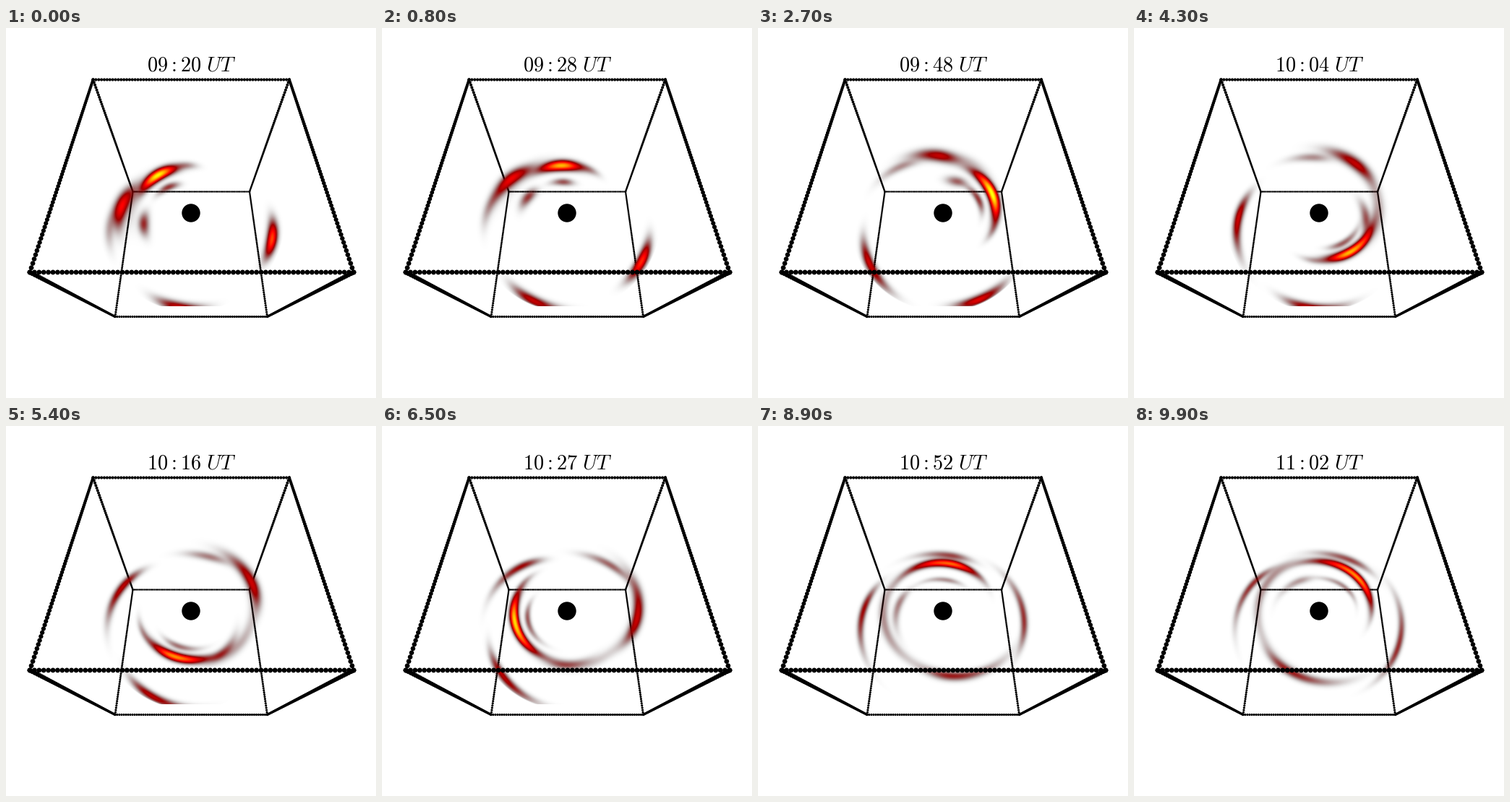
A matplotlib script that plays this animation: 512x512 px, repeating every 10000 ms.

```python
from collections import namedtuple

import numpy as np
import matplotlib.pyplot as plt
from matplotlib.animation import FuncAnimation

FRAMES = 100
SIZE, DPI = 512, 128
PX = 72 / DPI
CX = CY = 256

plt.rcParams["mathtext.fontset"] = "cm"


def cosd(a):
    return np.cos(np.radians(a))


def sind(a):
    return np.sin(np.radians(a))


# Polar grid: degrees clockwise from straight up
X0, X1, Y0, Y1 = 100, 412, 140, 400
gx, gy = np.meshgrid(np.arange(X0, X1) + 0.5, np.arange(Y0, Y1) + 0.5)
ANGLE = np.degrees(np.arctan2(gx - CX, CY - gy))
RADIUS = np.hypot(gx - CX, gy - CY)
LIMB = np.clip((130 - np.hypot(gx - 256, gy - 262)) / 2 + 0.5, 0, 1) * (gy < 385)


class Ring:
    """Tilted orbit: radius by angle, and uneven speed along it."""

    def __init__(self, size, drop, squash, skew, node=0):
        self.path = size - drop * cosd(ANGLE) - squash * cosd(2 * ANGLE)
        self.skew, self.node = skew, node

    def angle(self, phase):
        return phase + self.skew * sind(phase - self.node)


Spot = namedtuple("Spot", "ring phase rate length width pitch gain fade")

core = Ring(70, 0, 4, -9, 30)
inset = Ring(51, 4, 4, -9, 30)
middle = Ring(91, 5.5, 6, -9, 30)
shell = Ring(107, 27, 3, 8)
inner = Ring(62, 14, 2, 8)
bridge = Ring(80, 0, 3, 0)

spots = [
    Spot(core, -50, 4.65, 14, 4.6, -0.06, 0.75, 0.55),
    Spot(core, -12, 4.65, 9, 3.5, -0.06, 0.10, 0.07),
    Spot(inset, -50, 4.65, 12, 3.5, -0.06, 0.18, 0.10),
    Spot(middle, -92, 3.03, 11, 6, -0.25, 0.32, 0.22),
    Spot(inner, -95, 4.3, 9, 5, 0, 0.17, 0.09),
    Spot(bridge, -75, 3.8, 16, 6, -0.06, 0.05, 0.09),
    Spot(shell, 188, 2.02, 9, 4.6, -0.10, 0.32, 0.17),
    Spot(shell, 100, 2.02, 8, 4.6, -0.10, 0.42, 0.17),
    Spot(shell, -92, 2.02, 9, 4.6, -0.10, 0.07, 0.17),
]


def field(spot, i):
    t = i / (FRAMES - 1)
    angle = spot.ring.angle(spot.phase + spot.rate * i)
    da = (ANGLE - angle + 180) % 360 - 180
    # Orbital shear draws the spot out, mostly behind it, and thins it
    length = spot.length * np.where(da < 0, 1 + 1.4 * t, 1 + 0.5 * t)
    width = spot.width * (1 - 0.3 * t)
    dr = RADIUS - spot.ring.path - spot.pitch * da
    glow = (spot.gain + (spot.fade - spot.gain) * t) * (1 - 0.13 * cosd(2 * angle))
    return glow * np.exp(-0.5 * ((da / length) ** 2 + (dr / width) ** 2))


def cloud(i):
    v = sum(field(spot, i) for spot in spots) * LIMB
    rgba = plt.cm.hot(np.clip(v, 0, 0.85))
    rgba[..., 3] = np.clip(v * 4.5, 0, 1)
    return rgba


fig = plt.figure(figsize=(SIZE / DPI, SIZE / DPI), dpi=DPI, facecolor="white")
ax = fig.add_axes([0, 0, 1, 1])
ax.axis("off")


def edge(a, b, zorder, n=70):
    """Dotted edge in perspective; corners are (x, y, apparent width)."""
    t = np.linspace(0, 1, n + 1)
    wa, wb = (1 - t) / a[2], t / b[2]
    depth = wa + wb
    x = (wa * a[0] + wb * b[0]) / depth
    y = (wa * a[1] + wb * b[1]) / depth
    ax.scatter(x, y, s=(0.0152 / depth * PX) ** 2, c="black", lw=0, zorder=zorder)


def level(left, right, y):
    return [(left, y, right - left), (right, y, right - left)]


top = level(120.5, 392, 71.5)
front = level(33, 481, 338)
back = level(175.5, 337, 226.5)
floor = level(151, 361.5, 399.5)

for a, b, z in [(top, front, 3), (front, floor, 3), (top, back, 1), (back, floor, 1)]:
    for p, q in zip(a, b):
        edge(p, q, z)
for side, z in [(top, 3), (front, 3), (floor, 3), (back, 1)]:
    edge(*side, z)

glow = ax.imshow(cloud(0), extent=(X0, X1, Y1, Y0), interpolation="nearest",
                 aspect="auto", zorder=2)
ax.set(xlim=(0, SIZE), ylim=(SIZE, 0))
ax.add_patch(plt.Circle((CX, CY), 12.7, color="black", lw=0, zorder=4))
clock = ax.text(256.5, 59, "", fontsize=28.3 * PX, ha="center", va="baseline", zorder=5)


def update(i):
    minute = 560 + round(i * 102 / 99)
    clock.set_text(r"$\mathrm{%02d:%02d}\ UT$" % divmod(minute, 60))
    glow.set_data(cloud(i))
    return glow, clock


anim = FuncAnimation(fig, update, frames=FRAMES, interval=100, repeat=True,
                     repeat_delay=0)
plt.show()
```
